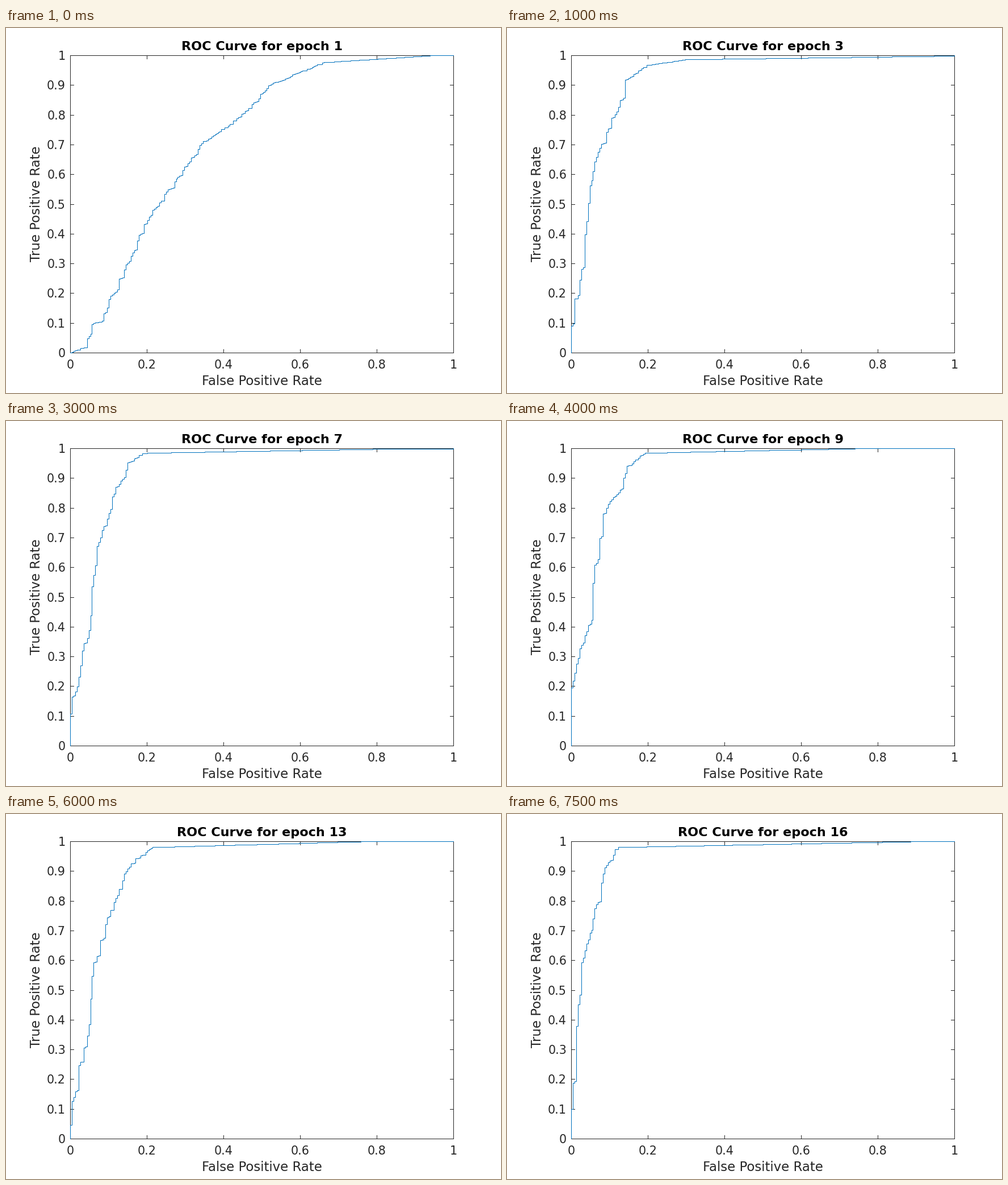
A matplotlib script for the animation above (8000 ms loop, 872 by 642 pixels).

```python
import numpy as np
import matplotlib.pyplot as plt
from matplotlib.animation import FuncAnimation

W, H, DPI = 872, 642, 64
LEFT, RIGHT, TOP, BOTTOM = 113, 788, 48, 571
NEGATIVES = 228     # each one is a horizontal step of the curve
EPOCHS = 16
JITTER = 1.4        # unevenness of the steps, in columns
INK, BLUE = "#262626", "#0072BD"
PX = 72 / DPI       # points per pixel

plt.rcParams["font.family"] = "DejaVu Sans"

# Outline of the curve at a few epochs: (false, true) positive rate in percent.
SHAPES = {
    1: [(0, 0), (4, 2), (6, 10), (8, 10.5), (20.5, 45.5), (35, 71), (45, 80),
        (52, 90), (66, 97.6), (95, 100)],
    3: [(0, 9), (2.6, 28), (4.6, 55), (7, 67), (13, 85), (14, 91.5),
        (20, 96.7), (30, 98.6), (99.9, 99.8)],
    5: [(0, 2), (4.5, 35), (5.7, 58), (9.4, 71), (10.3, 83), (15, 96),
        (20, 98.4), (99.9, 99.8)],
    9: [(0, 19.5), (5, 44), (8.5, 78), (13, 86.5), (14.5, 94), (19, 98.4),
        (39, 99), (78, 100)],
    11: [(0, 3.5), (1, 19), (5, 40), (10, 54), (11, 65), (14.7, 69), (18, 90),
         (22, 92.5), (25.5, 97.5), (85, 100)],
    13: [(0, 4.6), (2, 23), (4.4, 32), (5.7, 56), (10, 74), (15, 91.5),
         (21.5, 98), (78, 100)],
    16: [(0, 10), (1.3, 42), (3.2, 62), (7.3, 80), (8, 89), (12, 98),
         (92, 100)],
}


def outline(epoch, fpr):
    """Smooth true positive rate, blended between the nearest known shapes."""
    a = max(e for e in SHAPES if e <= epoch)
    b = min(e for e in SHAPES if e >= epoch)
    t = (epoch - a) / max(b - a, 1)
    ya, yb = (np.interp(100 * fpr, *zip(*SHAPES[e])) / 100 for e in (a, b))
    return (1 - t) * ya + t * yb


def curve(epoch):
    """Stage coordinates of the staircase for one epoch."""
    rng = np.random.default_rng(epoch)
    cols = np.arange(NEGATIVES + 1)
    uneven = np.sort(cols + rng.uniform(-JITTER, JITTER, cols.size))
    uneven[0] = 0
    tpr = np.maximum.accumulate(outline(epoch, uneven / NEGATIVES))
    tpr[-1] = 1
    x = np.repeat(cols / NEGATIVES, 2)
    y = np.append(0, np.repeat(tpr, 2)[:-1])
    return LEFT + x * (RIGHT - LEFT), BOTTOM - y * (BOTTOM - TOP)


fig = plt.figure(figsize=(W / DPI, H / DPI), dpi=DPI, facecolor="white")
ax = fig.add_axes([0, 0, 1, 1])
ax.set(xlim=(0, W), ylim=(H, 0))
ax.axis("off")


def line(xs, ys, color=INK, z=1):
    return ax.plot(xs, ys, color=color, lw=PX, snap=True, zorder=z,
                   solid_capstyle="projecting", solid_joinstyle="miter")[0]


def label(x, y, text, size, ha="center", **style):
    style.setdefault("color", INK)
    return ax.text(x, y, text, size=size * PX, ha=ha, va="baseline", **style)


line([LEFT, RIGHT, RIGHT, LEFT, LEFT], [TOP, TOP, BOTTOM, BOTTOM, TOP])
TICK, SMALL, LARGE, BOLD = 6, 20.8, 22.9, 22.4
for v in np.linspace(0, 1, 6):
    x = LEFT + v * (RIGHT - LEFT)
    line([x, x], [BOTTOM, BOTTOM - TICK])
    line([x, x], [TOP, TOP + TICK])
    label(x + 0.5, 599, f"{v:.1g}", SMALL)
for v in np.linspace(0, 1, 11):
    y = BOTTOM - v * (BOTTOM - TOP)
    line([LEFT, LEFT + TICK], [y, y])
    line([RIGHT, RIGHT - TICK], [y, y])
    label(105, y + 8, f"{v:.1g}", SMALL, ha="right")

label(451, 628, "False Positive Rate", LARGE)
label(60, 309.5, "True Positive Rate", LARGE, rotation=90,
      rotation_mode="anchor")
title = label(451, 39, "", BOLD, weight="bold", color="black")
roc = line([], [], BLUE, z=2)


def draw(i):
    epoch = i % EPOCHS + 1
    title.set_text(f"ROC Curve for epoch {epoch}")
    roc.set_data(*curve(epoch))
    return title, roc


anim = FuncAnimation(fig, draw, frames=EPOCHS, interval=500, repeat=True,
                     repeat_delay=0, blit=False)
plt.show()
```
